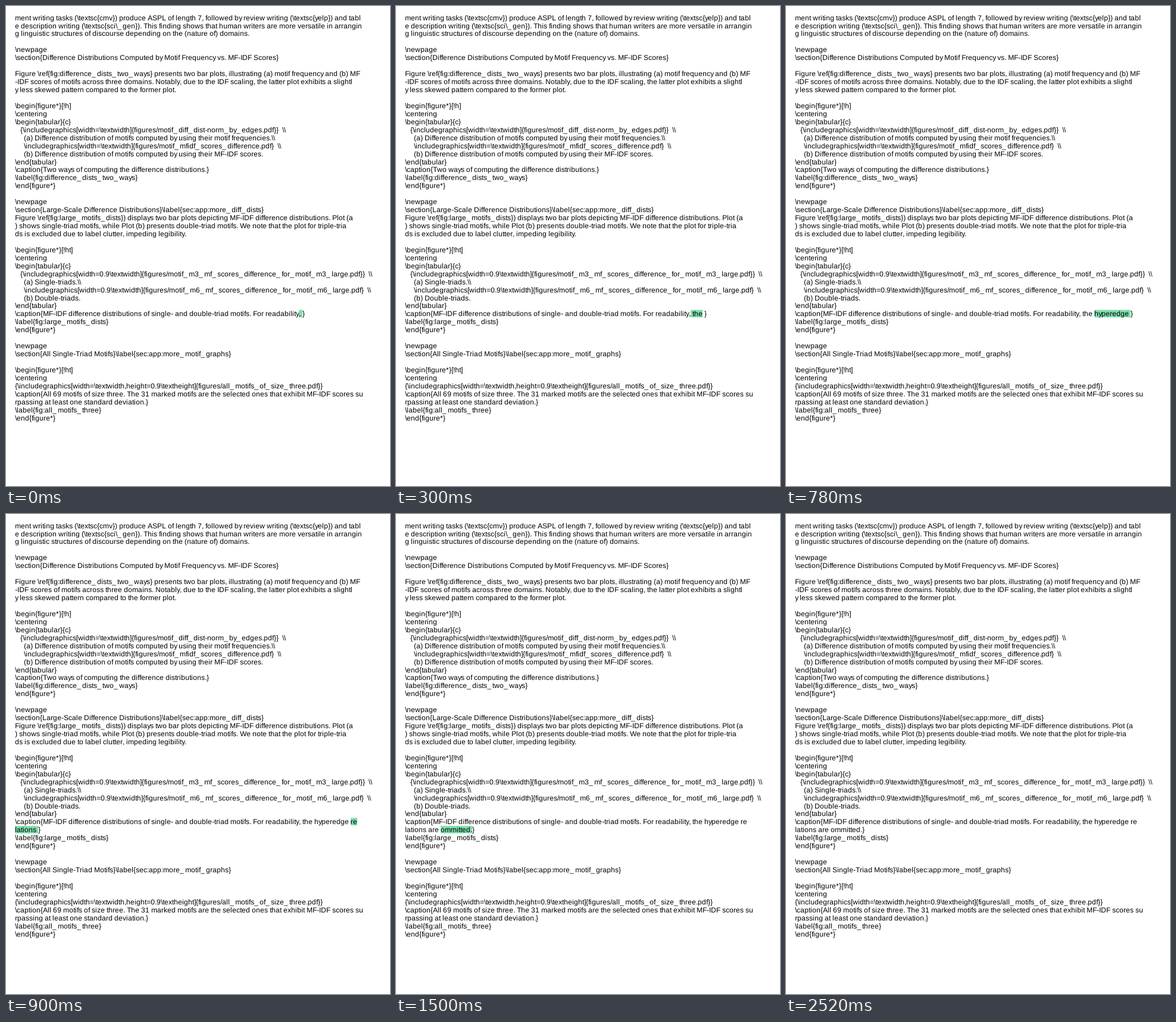
Write an HTML page with a canvas that moves like this. It is 670 px wide and 836 px high and loops after 3000 ms.

```html
<!DOCTYPE html>
<html lang="en">
<head>
<meta charset="utf-8">
<title>Typing a caption</title>
<style>
  html, body { margin: 0; width: 100%; height: 100%; overflow: hidden; background: #fff; }
  canvas { display: block; }
</style>
</head>
<body>
<canvas id="stage" width="670" height="836"></canvas>
<script>
const ctx = document.getElementById("stage").getContext("2d");
const LEFT = 15.65, TOP = 13.5, LINE = 13.94, ASCENT = 11.1, MARK_HEIGHT = 13;
const FAMILY = '"Liberation Sans", Arial, sans-serif';
const SIZE = 12, SCALE = 1.0385;
const STEP_MS = 300, LOOP_MS = 3000;

const before = String.raw`ment writing tasks (\textsc{cmv}) produce ASPL of length 7, followed by review writing (\textsc{yelp}) and tabl
e description writing (\textsc{sci\_gen}). This finding shows that human writers are more versatile in arrangin
g linguistic structures of discourse depending on the (nature of) domains.

\newpage
\section{Difference Distributions Computed by Motif Frequency vs. MF-IDF Scores}

Figure \ref{fig:difference_dists_two_ways} presents two bar plots, illustrating (a) motif frequency and (b) MF
-IDF scores of motifs across three domains. Notably, due to the IDF scaling, the latter plot exhibits a slightl
y less skewed pattern compared to the former plot.

\begin{figure*}[!h]
\centering
\begin{tabular}{c}
   {\includegraphics[width=\textwidth]{figures/motif_diff_dist-norm_by_edges.pdf}}  \\
     (a) Difference distribution of motifs computed by using their motif frequencies.\\
     \includegraphics[width=\textwidth]{figures/motif_mfidf_scores_difference.pdf}  \\
     (b) Difference distribution of motifs computed by using their MF-IDF scores.
\end{tabular}
\caption{Two ways of computing the difference distributions.}
\label{fig:difference_dists_two_ways}
\end{figure*}

\newpage
\section{Large-Scale Difference Distributions}\label{sec:app:more_diff_dists}
Figure \ref{fig:large_motifs_dists}) displays two bar plots depicting MF-IDF difference distributions. Plot (a
) shows single-triad motifs, while Plot (b) presents double-triad motifs. We note that the plot for triple-tria
ds is excluded due to label clutter, impeding legibility.

\begin{figure*}[!ht]
\centering
\begin{tabular}{c}
   {\includegraphics[width=0.9\textwidth]{figures/motif_m3_mf_scores_difference_for_motif_m3_large.pdf}}  \\
     (a) Single-triads.\\
     \includegraphics[width=0.9\textwidth]{figures/motif_m6_mf_scores_difference_for_motif_m6_large.pdf}  \\
     (b) Double-triads.
\end{tabular}
\caption{MF-IDF difference distributions of single- and double-triad motifs. For readability`;

const after = String.raw`}
\label{fig:large_motifs_dists}
\end{figure*}

\newpage
\section{All Single-Triad Motifs}\label{sec:app:more_motif_graphs}

\begin{figure*}[!ht]
\centering
{\includegraphics[width=\textwidth,height=0.9\textheight]{figures/all_motifs_of_size_three.pdf}}
\caption{All 69 motifs of size three. The 31 marked motifs are the selected ones that exhibit MF-IDF scores su
rpassing at least one standard deviation.}
\label{fig:all_motifs_three}
\end{figure*}`;

// Each step: text already typed, newly typed (marked) text, trailing text.
const steps = [
  ["", ", ", ""],
  [",", " the", " "],
  [", the ", "hyperedge ", ""],
  [", the hyperedge ", "re\nlations ", ""],
  [", the hyperedge re\nlations ", "are ", ""],
  [", the hyperedge re\nlations are ", "ommitted.", ""],
  [", the hyperedge re\nlations are ommitted.", "", ""]
];

// Glyph advances are whole pixels at 12px, as in hinted text, then scaled.
const advances = { _: 9 * SCALE, y: 5 * SCALE };
function advance(ch) {
  if (!(ch in advances)) {
    ctx.font = `${SIZE * 100}px ${FAMILY}`;
    advances[ch] = Math.round(ctx.measureText(ch).width / 100) * SCALE;
  }
  return advances[ch];
}

function write(pen, text, marked) {
  text.split("\n").forEach((part, i) => {
    if (i) {
      pen.x = LEFT;
      pen.y += LINE;
    }
    const glyphs = [...part].map(ch => [ch, advance(ch)]);
    if (marked) {
      ctx.fillStyle = "#7fdfae";
      ctx.fillRect(pen.x, pen.y, glyphs.reduce((sum, [, width]) => sum + width, 0), MARK_HEIGHT);
    }
    ctx.fillStyle = "#000";
    ctx.font = `${SIZE * SCALE}px ${FAMILY}`;
    for (const [ch, width] of glyphs) {
      ctx.fillText(ch, pen.x, pen.y + ASCENT);
      pen.x += width;
    }
  });
}

function draw([typed, fresh, trail]) {
  ctx.fillStyle = "#fff";
  ctx.fillRect(0, 0, 670, 836);
  const pen = { x: LEFT, y: TOP };
  write(pen, before + typed);
  write(pen, fresh, fresh !== "");
  write(pen, trail + after);
}

ctx.textRendering = "geometricPrecision";
let shown = -1;
const start = performance.now();
function tick() {
  const time = (performance.now() - start) % LOOP_MS;
  const index = Math.min(Math.floor(time / STEP_MS), steps.length - 1);
  if (index !== shown) draw(steps[shown = index]);
  requestAnimationFrame(tick);
}
tick();
</script>
</body>
</html>
```
